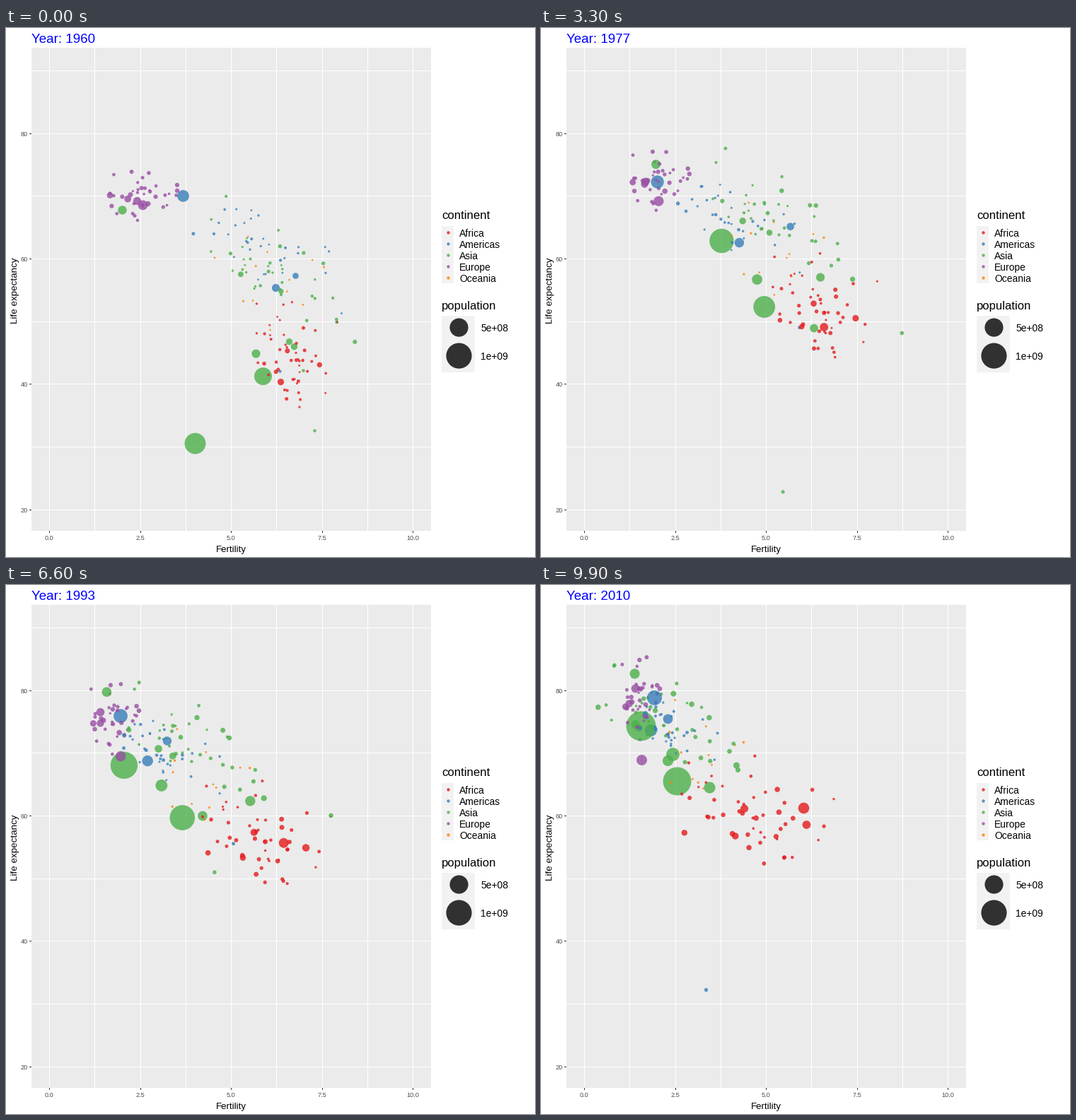
A matplotlib script that plays this animation: 748x748 px, repeating every 10000 ms.

```python
import numpy as np
import matplotlib.pyplot as plt
from matplotlib.animation import FuncAnimation
from matplotlib.patches import Rectangle

SIZE, DPI, FRAMES = 748, 100, 100
PT = 72 / DPI
START, SPAN = 1960, 50
COLORS = {"Africa": "#E41A1C", "Americas": "#377EB8", "Asia": "#4DAF4A",
          "Europe": "#984EA3", "Oceania": "#FF7F00"}
AF, AM, AS, EU, OC = COLORS.values()

plt.rcParams["font.family"] = "Liberation Sans"
rng = np.random.default_rng(7)


def diameter(millions):
    return 2 + 1.08 * np.sqrt(millions)


class Track:
    """One large or outlying country, moving straight between key points."""

    def __init__(self, color, pop0, pop1, *keys, years=(1960, 1972, 1988, 2010)):
        self.colors = [color]
        self.pops = pop0, pop1
        self.xs, self.ys = zip(*keys)
        self.years = years
        self.rank = None

    def at(self, t):
        xy = np.interp(t, self.years, self.xs), np.interp(t, self.years, self.ys)
        return np.array([xy]), np.interp(t, (START, START + SPAN), self.pops)[None]


class Cloud:
    """Many small countries, scattered around a centre that eases to its end.

    start and end hold centre x, centre y, spread x, spread y; ease holds the
    power of time that bends each axis of the centre's path.
    """

    def __init__(self, color, count, pop, growth, tilt, start, end, ease):
        self.colors = [color] * count
        self.start, self.end = np.array(start), np.array(end)
        self.ease = np.array((*ease, 1, 1))
        u, v = np.clip(rng.normal(size=(2, count)), -1.9, 1.9)
        self.place = np.stack((u, tilt * u + (1 - tilt ** 2) ** .5 * v), 1)
        self.drift = rng.normal(size=(count, 2)) * .35
        self.pop = pop * np.exp(rng.normal(size=count) * .95)
        self.growth = growth
        self.rank = rng.random(count)

    def at(self, t):
        s = (t - START) / SPAN
        now = self.start + (self.end - self.start) * s ** self.ease
        xy = now[:2] + now[2:] * (self.place + self.drift * s)
        return xy, self.pop * (1 + (self.growth - 1) * s)


# Key points are stage pixels, populations are millions.
tracks = [
    Track(AS, 48, 151, (407, 450), (417, 454), (309, 351), (179, 248)),
    Track(AM, 72, 196, (381, 367), (307, 320), (214, 262), (155, 205)),
    Track(AS, 667, 1360, (267, 587), (447, 415), (314, 314), (200, 288), (195, 268),
          (136, 240), (141, 199), years=(1960, 1963, 1972, 1981, 1988, 1999, 2010)),
    Track(EU, 73, 83, (185, 244), (153, 228), (133, 190), (133, 146)),
    Track(AM, 4, 10, (387, 485), (350, 381), (236, 319), (233, 572),
          years=(1960, 1988, 2009, 2010)),
    Track(AS, 450, 1230, (363, 492), (335, 414), (267, 345), (192, 277)),
    Track(AS, 88, 241, (353, 460), (336, 379), (230, 297), (186, 239)),
    Track(AS, 93, 127, (164, 257), (169, 206), (145, 159), (132, 125)),
    Track(AM, 38, 118, (409, 350), (397, 301), (243, 230), (179, 189)),
    Track(AF, 45, 159, (388, 500), (400, 440), (399, 380), (371, 315)),
    Track(AS, 45, 173, (400, 443), (401, 369), (379, 311), (238, 286)),
    Track(EU, 120, 143, (193, 250), (165, 246), (168, 240), (142, 247)),
    Track(AM, 186, 310, (250, 237), (165, 227), (162, 193), (160, 159)),
    Track(AS, 6, 14, (420, 484), (378, 506), (339, 666), (362, 521), (203, 250),
          years=(1960, 1972, 1977, 1981, 2010)),
    Track(AS, 5, 23, (436, 569), (529, 395), (517, 346), (278, 261),
          years=(1960, 1981, 1988, 2010)),
]
for k, track in enumerate(tracks):
    track.rank = [k / len(tracks)]

clouds = [
    Cloud(AF, 50, 3.6, 3.3, .3, (411, 470, 30, 44), (316, 332, 56, 42), (2.3, .67)),
    Cloud(AM, 32, 1.8, 2.2, .65, (360, 302, 60, 38), (182, 200, 28, 21), (.58, .9)),
    Cloud(AS, 38, 3.5, 2.8, .5, (392, 367, 54, 54), (185, 200, 46, 36), (1.3, .65)),
    Cloud(EU, 37, 7, 1.2, .1, (194, 238, 25, 18), (142, 165, 12, 28), (.65, 1.15)),
    Cloud(OC, 12, .4, 2, .3, (375, 340, 62, 48), (225, 225, 42, 42), (1.07, .93)),
]
groups = tracks + clouds
order = np.argsort(np.concatenate([g.rank for g in groups]))
colors = np.concatenate([g.colors for g in groups])[order]

fig = plt.figure(figsize=(SIZE / DPI, SIZE / DPI), dpi=DPI, facecolor="white")
ax = fig.add_axes((0, 0, 1, 1))
ax.set(xlim=(0, SIZE), ylim=(SIZE, 0))
ax.axis("off")


def box(x0, y0, x1, y1, color):
    ax.add_patch(Rectangle((x0, y0), x1 - x0, y1 - y0, fc=color, lw=0, zorder=0))


def line(xs, ys, color):
    ax.plot(xs, ys, color=color, lw=PT, snap=False, solid_capstyle="butt", zorder=1)


def label(x, y, text, px, color="black", **kw):
    return ax.text(x, y, text, fontsize=px * PT, color=color, va="baseline", **kw)


def dots(xy, diameters, colors):
    return ax.scatter(*np.transpose(xy), s=(np.array(diameters) * PT) ** 2,
                      c=colors, alpha=.8, linewidths=0, zorder=3)


# Panel, grid and axes
box(36, 28, 601, 711, "#EBEBEB")
for k in range(9):
    x = int(61.4 + 64.3 * k) + .5
    y = int(681 - 88.63 * k) + .5
    line((x, x), (28, 711), "white")
    if k < 8:
        line((36, 601), (y, y), "white")
    if k % 2 == 0:
        line((x, x), (711, 714), "#333333")
        label(x - .5, 724.5, f"{k * 1.25:.1f}", 9.2, "#4D4D4D", ha="center")
        if k < 8:
            line((33, 36), (y, y), "#333333")
            label(31, y + 3.5, str(20 + 10 * k), 9.2, "#4D4D4D", ha="right")
label(318, 740.5, "Fertility", 13.3, ha="center")
label(16.5, 371, "Life expectancy", 13.4, ha="center", rotation=90,
      rotation_mode="anchor")

# Legends
label(616, 270, "continent", 16.7)
box(616, 280, 633, 361, "#F2F2F2")
for k, (name, color) in enumerate(COLORS.items()):
    y = 288.5 + 16.2 * k
    dots([(625, y)], [4.4], [color])
    label(641, y + 6, name, 13.9)
label(616, 397.5, "population", 16.6)
box(616, 407, 663, 487, "#F2F2F2")
for y, millions, name in ((423, 500, "5e+08"), (463, 1000, "1e+09")):
    dots([(640, y)], [diameter(millions)], ["black"])
    label(671, y + 6, name, 13.9)

title = label(36, 20.5, "", 18.8, "blue")
bubbles = dots(np.zeros((len(colors), 2)), np.ones(len(colors)), colors)


def draw(i):
    t = START + SPAN * i / (FRAMES - 1)
    title.set_text(f"Year: {round(t)}")
    places, pops = zip(*(g.at(t) for g in groups))
    bubbles.set_offsets(np.concatenate(places)[order] + .5)
    bubbles.set_sizes((diameter(np.concatenate(pops)[order]) * PT) ** 2)
    return title, bubbles


anim = FuncAnimation(fig, draw, frames=FRAMES, interval=100, repeat=True,
                     repeat_delay=0, blit=False)
plt.show()
```
